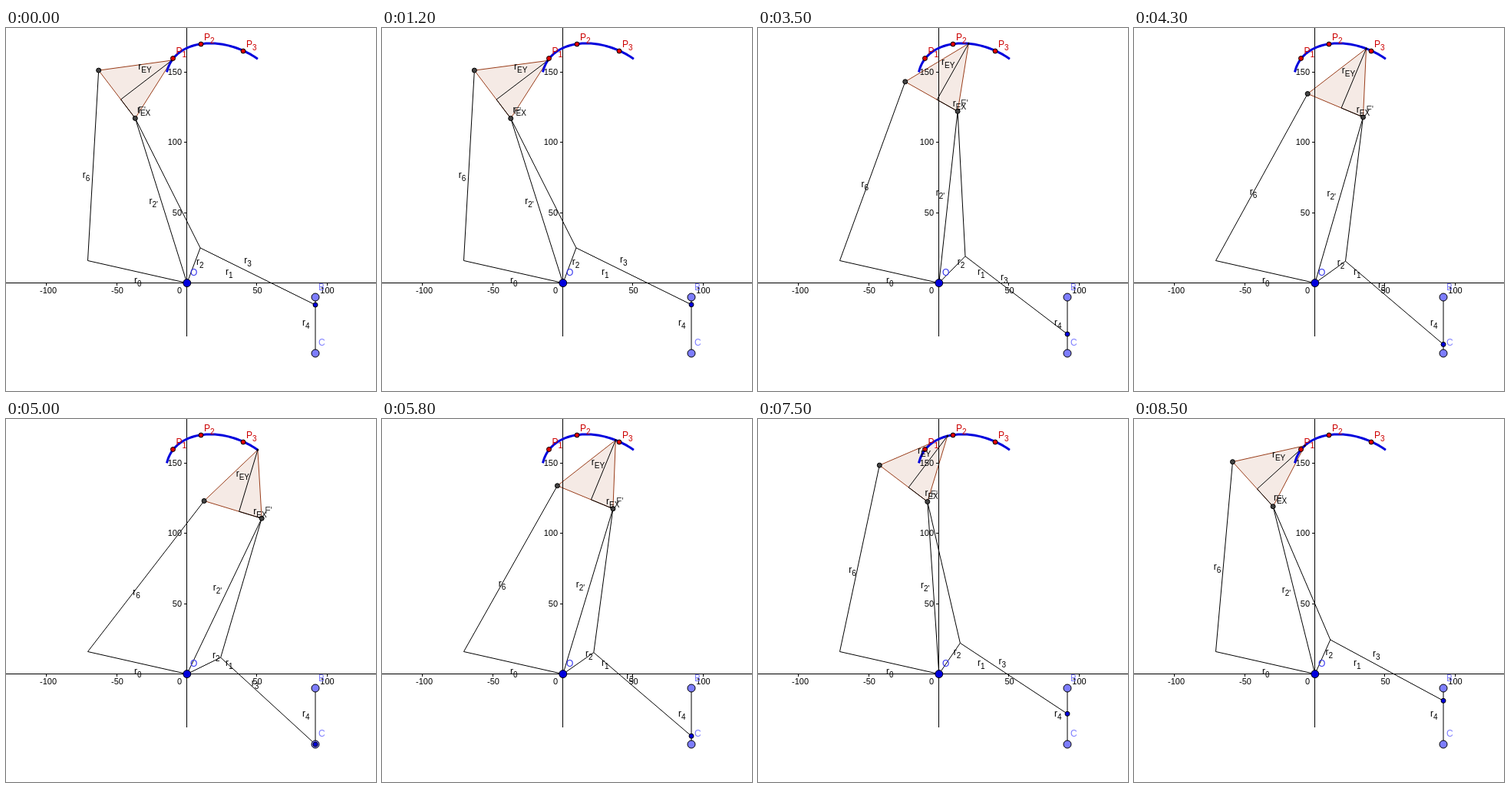
Animation, 482 px wide and 472 px high, one loop 9000 ms. Source, as an HTML page with a canvas:

```html
<!DOCTYPE html>
<html lang="en">
<head>
<meta charset="utf-8">
<title>Linkage</title>
<style>
html, body { margin: 0; width: 100%; height: 100%; overflow: hidden; background: #fff; }
canvas { display: block; }
</style>
</head>
<body>
<canvas id="stage" width="482" height="472"></canvas>
<script>
const ctx = document.getElementById('stage').getContext('2d');
const FONT = '"Liberation Sans", Arial, sans-serif';
const O = [235.8, 331.6], G = [106.5, 302.5], B = [403, 350], C = [403, 423];

// Point at distance a from p and b from q, on the left of p -> q
function meet(p, a, q, b) {
  const dx = q[0] - p[0], dy = q[1] - p[1], d = Math.hypot(dx, dy);
  const along = (d * d + a * a - b * b) / (2 * d);
  const side = Math.sqrt(a * a - along * along);
  return [p[0] + (along * dx + side * dy) / d, p[1] + (along * dy - side * dx) / d];
}

const mix = (p, q, k) => [p[0] + (q[0] - p[0]) * k, p[1] + (q[1] - p[1]) * k];

// The whole linkage follows from the height of the slider
function pose(y) {
  const D = [403, y];
  const A = meet(O, 48.8, D, 167.2);
  const E = meet(O, 224.6, A, 188.7);
  const F = meet(G, 247.8, E, 78.4);
  return { D, A, E, F, M: mix(E, F, 0.393), P: meet(F, 96.3, E, 89.2) };
}

function sliderY(n) {
  if (n < 6) return 360 - n * 1.667;
  if (n <= 51) return Math.min(C[1], Math.max(B[1], 359.7 + (n - 12) * 1.667));
  return 423 - Math.max(0, n - 51.65) * 1.7;
}

function path(points, color = '#000', width = 1, fill) {
  ctx.beginPath();
  points.forEach(p => ctx.lineTo(...p));
  if (fill) {
    ctx.closePath();
    ctx.fillStyle = fill;
    ctx.fill();
  }
  ctx.strokeStyle = color;
  ctx.lineWidth = width;
  ctx.stroke();
}

function dot(p, r, color) {
  ctx.beginPath();
  ctx.arc(...p, r, 0, Math.PI * 2);
  ctx.fillStyle = color;
  ctx.fill();
  ctx.strokeStyle = '#000';
  ctx.lineWidth = 1;
  ctx.stroke();
}

function text(s, x, y, size, color = '#000', align = 'left') {
  ctx.font = `${size}px ${FONT}`;
  ctx.textAlign = align;
  ctx.fillStyle = color;
  ctx.fillText(s, x, y);
}

function label(main, sub, x, y, color) {
  text(main, x, y, 12, color);
  text(sub, x + ctx.measureText(main).width, y + 4, 10, color);
}

// Label 16 px to the left of the middle of p -> q, plus an offset
function segmentLabel(sub, p, q, ox, oy) {
  const dx = q[0] - p[0], dy = q[1] - p[1], k = 16 / Math.hypot(dx, dy);
  const [x, y] = mix(p, q, 0.5);
  label('r', sub, x + dy * k + ox, y - dx * k + oy);
}

function axes() {
  path([[0, 331.5], [482, 331.5]]);
  path([[235.5, 0], [235.5, 401]]);
  [[-100, 55], [-50, 145], [50, 327.5], [100, 418.5]].forEach(([v, x]) => {
    const tick = Math.round(235 + v * 1.828) + 0.5;
    path([[tick, 331], [tick, 335]]);
    text(v, x, 345, 11, '#000', 'center');
  });
  [50, 100, 150].forEach(v => {
    const tick = Math.round(331 - v * 1.828) + 0.5;
    path([[232, tick], [236, tick]]);
    text(v, 229, tick + 3.5, 11, '#000', 'right');
  });
  text('0', 229, 345, 11, '#000', 'right');
}

const trace = Array.from({ length: 74 }, (_, i) => pose(B[1] + i).P);
const targets = [[217.5, 39.5], [254, 21], [309, 30]];

function draw(n) {
  const { D, A, E, F, M, P } = pose(sliderY(n));
  ctx.fillStyle = '#fff';
  ctx.fillRect(0, 0, 482, 472);

  path([F, P, E, F], '#993d1a', 1, 'rgba(153,51,0,0.1)');
  axes();
  path([O, G, F]);
  path([E, O, A, E]);
  path([A, D]);
  path([B, C]);
  path([E, M, P]);
  path(trace, '#00d', 3);

  dot(P, 1, '#222');
  dot(O, 5, '#00d');
  dot(B, 5, '#7d7dff');
  dot(C, 5, '#7d7dff');
  dot(D, 3, '#00d');
  dot(E, 3, '#444');
  dot(F, 3, '#444');
  targets.forEach((p, i) => {
    dot(p, 3, '#d00');
    label('P', i + 1, p[0] + 4, p[1] - 5.5, '#c00');
  });

  label('r', '0', 167, 332);
  label('r', '1', 286, 321);
  label('r', '4', 386, 387);
  segmentLabel('2', O, A, 18.4, 4.6);
  segmentLabel('3', D, A, -10.8, -31.8);
  segmentLabel("2'", O, E, -0.3, -0.3);
  segmentLabel('6', F, G, -29.7, 15);
  segmentLabel('EY', M, P, -0.8, -0.6);
  segmentLabel('EX', M, E, -0.7, 14.7);
  text("F'", E[0] + 4, E[1] - 6, 12, '#444');
  text('O', 240, 321.5, 12, '#33e');
  text('B', 407, 340.5, 12, '#7d7dff');
  text('C', 407, 413, 12, '#7d7dff');
}

const start = performance.now();
function tick() {
  const t = (performance.now() - start) % 9000;
  draw(Math.min(85, Math.floor(t / 100)));
  requestAnimationFrame(tick);
}
tick();
</script>
</body>
</html>
```
